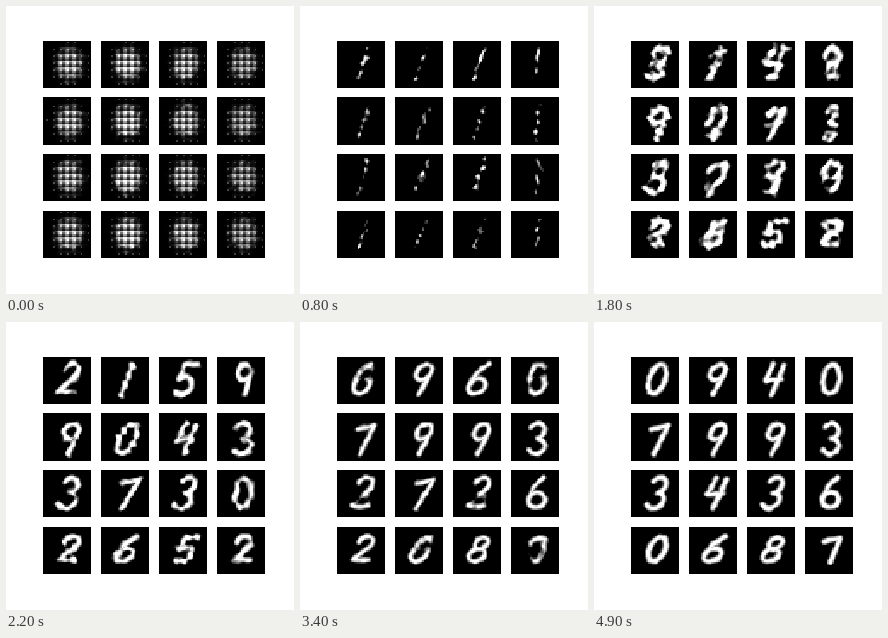
A matplotlib script that plays this animation: 288x288 px, repeating every 5.1 s.

```python
import numpy as np
import matplotlib.pyplot as plt
from matplotlib.animation import FuncAnimation

GRID = 28
LAST = 49
Y, X = np.mgrid[0:GRID, 0:GRID].astype(float)

# Digit each cell resembles at the key epochs, row by row.
READINGS = {
    8: "1111 1111 1111 1111",
    14: "5742 9971 6049 4858",
    22: "2159 9043 3730 2652",
    28: "6960 7993 2726 2080",
    41: "0965 7993 3736 2687",
    49: "0940 7993 3436 0687",
}
EPOCHS = list(READINGS)
PEN_WIDTH = [0.1, 2.2, 1.35, 1.35, 1.25, 1.45]
RIPPLE = [1.4, 1.2, 0.7, 0.35, 0.3, 0.3]

SLANT = [2.5, 3.5, 3, 1]          # by column
CENTER_Y = [13, 14.5, 13.5, 13]   # by row
HALF_HEIGHT = [9, 9, 9, 7.5]      # by row


def arc(cx, cy, rx, ry, start=0, end=360):
    a = np.radians(np.linspace(start, end, 16))
    return [(cx + rx * np.cos(t), cy + ry * np.sin(t)) for t in a]


# Pen strokes in a box from -1 to 1, y pointing down.
DIGITS = {
    "0": [arc(0, 0, 0.9, 0.95)],
    "1": [[(0, -1), (0, 1)]],
    "2": [arc(0, -0.5, 0.8, 0.5, 190, 400) + [(-0.8, 0.8), (1, 0.85)]],
    "3": [arc(-0.1, -0.5, 0.8, 0.5, 210, 440),
          arc(0, 0.5, 0.9, 0.5, 270, 510)],
    "4": [[(-0.5, -1), (-0.8, 0.1), (0.8, 0)], [(0.7, -0.9), (0.4, 1)]],
    "5": [[(0.9, -0.95), (-0.5, -0.9), (-0.7, 0)]
          + arc(0, 0.4, 0.9, 0.55, 230, 490)],
    "6": [[(0.5, -1), (-0.5, -0.4)] + arc(0, 0.45, 0.9, 0.5, 180, 540)],
    "7": [[(-0.9, -0.6), (0.8, -0.85), (0.1, 1)]],
    "8": [arc(0, -0.45, 0.7, 0.45), arc(0, 0.45, 0.85, 0.5)],
    "9": [arc(0, -0.45, 0.8, 0.5) + [(0.4, 1)]],
}


def segment_distance(a, b):
    (ax, ay), (bx, by) = a, b
    dx, dy = bx - ax, by - ay
    t = np.clip(((X - ax) * dx + (Y - ay) * dy) / (dx * dx + dy * dy), 0, 1)
    return np.hypot(X - ax - t * dx, Y - ay - t * dy)


def digit_distance(digit, index):
    """Distance of every pixel to the digit, in the cell's handwriting."""
    row, col = divmod(index, 4)

    def place(x, y):
        return (14.8 + 5.3 * x - SLANT[col] * y,
                CENTER_Y[row] + HALF_HEIGHT[row] * y)

    dist = np.full((GRID, GRID), 5.0)
    for stroke in DIGITS[digit]:
        pts = [place(*p) for p in stroke]
        for a, b in zip(pts, pts[1:]):
            dist = np.minimum(dist, segment_distance(a, b))
    return dist


distances = [[digit_distance(text.replace(" ", "")[i], i)
              for text in READINGS.values()] for i in range(16)]


def ripples(rng):
    """Smooth random noise, about -1 to 1."""
    total = np.zeros((GRID, GRID))
    for _ in range(6):
        kx, ky = rng.uniform(-1.3, 1.3, 2)
        total += np.cos(kx * X + ky * Y + rng.uniform(0, 2 * np.pi))
    return total / 3


def untrained(index):
    """Oval of wedges repeating every four pixels, with stray dots around."""
    rng = np.random.default_rng(index)
    radius = np.hypot((X - 15) / 8.5, (Y - 13.5) / 10) + 0.12 * ripples(rng)
    oval = 1 / (1 + np.exp(9 * (radius - 0.85)))
    wedge = np.clip(1.3 - 0.25 * (Y % 4) - 0.4 * np.abs(X % 4 - 1.5), 0.1, 1)
    dots = 0.25 * ((X % 4 == 2) & (Y % 4 == 1)) * (radius < 1.4)
    strength = 1.05 - 0.15 * abs(index % 4 - 1)
    return np.clip(strength * oval * wedge + dots, 0, 1)


textures = [untrained(i) for i in range(16)]


def handwriting(index, epoch):
    epoch = max(epoch, EPOCHS[0])
    k = min(np.searchsorted(EPOCHS, epoch, side="right"), len(EPOCHS) - 1)
    t = (epoch - EPOCHS[k - 1]) / (EPOCHS[k] - EPOCHS[k - 1])
    t = t * t * (3 - 2 * t)
    dist = (1 - t) * distances[index][k - 1] + t * distances[index][k]
    return np.interp(epoch, EPOCHS, PEN_WIDTH) - dist


def sample(index, epoch):
    rng = np.random.default_rng(100 * index + epoch)
    noise = np.interp(epoch, EPOCHS, RIPPLE) * ripples(rng)
    ink = np.clip(0.5 + 0.65 * (handwriting(index, epoch) + noise), 0, 1)
    fade = max(0, 1 - epoch / 5)
    return np.maximum(fade * textures[index], (1 - fade) * ink)


fig, axes = plt.subplots(4, 4, figsize=(4, 4), dpi=72, facecolor="white")
fig.subplots_adjust(left=0.125, right=0.9, bottom=0.125, top=0.88,
                    wspace=0.2, hspace=0.2)
images = []
for i, ax in enumerate(axes.flat):
    ax.axis("off")
    images.append(ax.imshow(sample(i, 0), cmap="gray", vmin=0, vmax=1,
                            interpolation="nearest"))


def update(frame):
    epoch = min(frame, LAST)
    for i, image in enumerate(images):
        image.set_data(sample(i, epoch))
    return images


anim = FuncAnimation(fig, update, frames=LAST + 2, interval=100, repeat=True)
plt.show()
```
